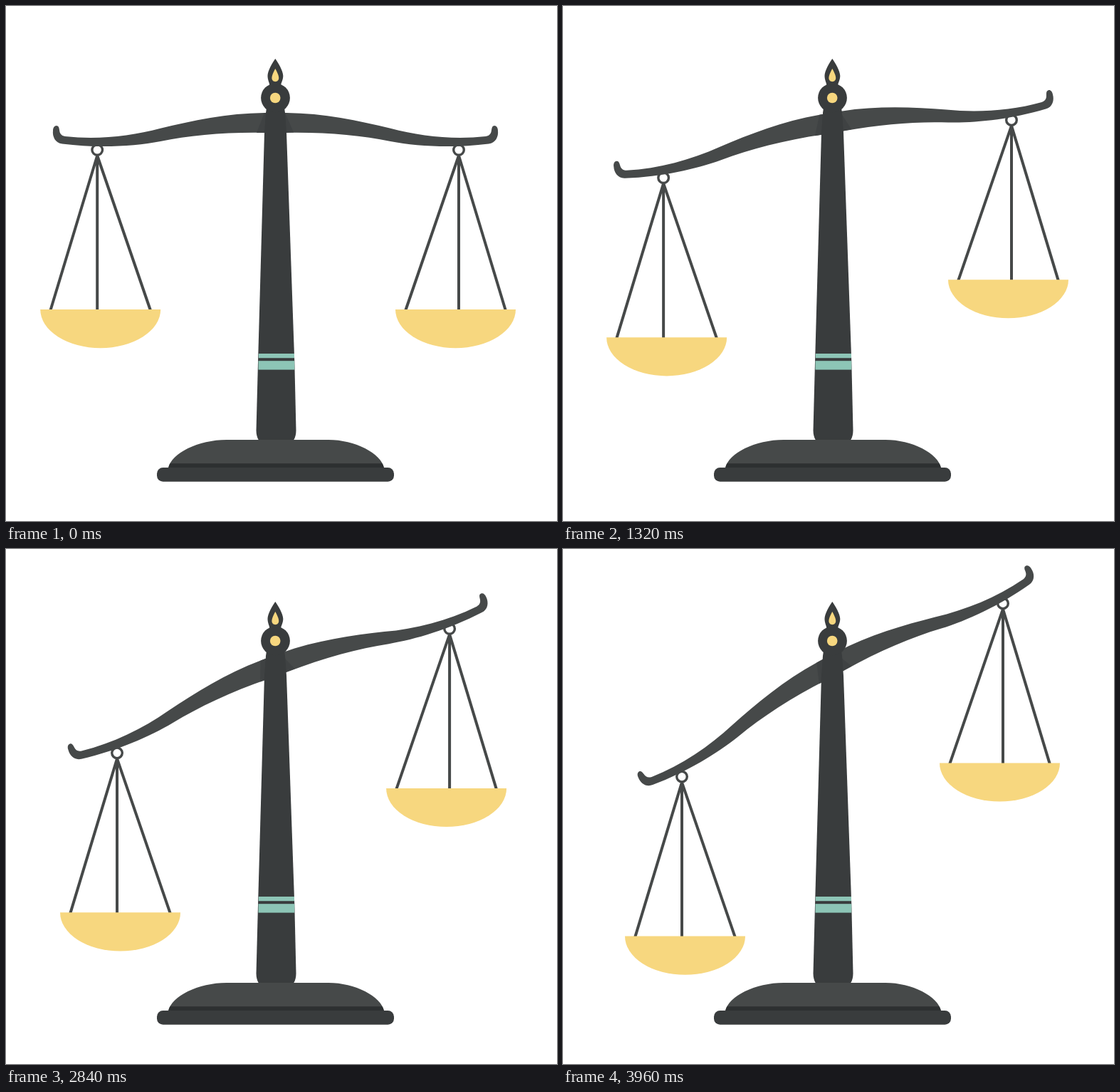
An HTML page with a canvas for the animation above (4000 ms loop, 774 px wide and 723 px high).

```html
<!DOCTYPE html>
<html lang="en">
<head>
<meta charset="utf-8">
<title>Balance scale</title>
<style>
  html, body { margin: 0; width: 100%; height: 100%; overflow: hidden; background: #fff; }
  canvas { display: block; }
</style>
</head>
<body>
<canvas id="stage" width="774" height="723"></canvas>
<script>
const ctx = document.getElementById('stage').getContext('2d');
const LOOP = 4000, STEP = 40, LAST = LOOP - STEP;
const TILT = -28 * Math.PI / 180;
const PIVOT = { x: 378.5, y: 168 };
const GREY = '#464949', DARK = '#393c3d', SHADE = '#3f4243', DEEP = '#2d3031';
const GOLD = '#f7d77f', MINT = '#8dc5b6';

// Half of the beam, relative to the pivot; the other half is its mirror image.
const halfBeam = new Path2D(`M1 -18 L-15.5 -18
  C-68 -17.5 -117 -7 -161.5 3.8 C-204 15 -250 20 -295.5 15
  C-301 14 -303 11 -303.5 6 C-304 2 -305 0 -307.5 0
  C-310.5 0 -312.5 3 -312.5 7 C-313.5 15 -309.5 24.5 -299.5 25.5
  C-248 32 -199 29 -161.5 22 C-120 13.5 -69 9 -15.5 10 L1 10 Z`);
const beamShade = new Path2D('M-15.5 -18 L13.5 -18 L25.5 9.5 L-26.5 10 Z');

const pole = new Path2D(`M366 143 L391 143 L392 150 L394 178 L405.3 500 L407.5 596
  Q407.5 604 404 609.5 L355 609.5 Q351.5 604 351.5 596 L354 500 L363 178 L365 150 Z`);
const flame = new Path2D(`M378.3 74 C382 79 389.3 91 389.3 98 C389.3 104 386.5 107 386 112
  L370.5 112 C370 107 367.5 104 367.5 98 C367.5 91 374.5 79 378.3 74 Z`);
const drop = new Path2D(`M378.3 88 C380 91 383.2 97 383.2 101 C383.2 104.2 381 106.2 378.3 106.2
  C375.6 106.2 373.4 104.2 373.4 101 C373.4 97 376.6 91 378.3 88 Z`);
const dome = new Path2D(`M228 648.5 C232 628 270 609 310 609 L453 609
  C490 609 527 628 531 648.5 Z`);

function fill(path, color) {
  ctx.fillStyle = color;
  ctx.fill(path);
}

function disc(x, y, r, color) {
  ctx.fillStyle = color;
  ctx.beginPath();
  ctx.arc(x, y, r, 0, Math.PI * 2);
  ctx.fill();
}

function rect(x, y, w, h, color) {
  ctx.fillStyle = color;
  ctx.fillRect(x, y, w, h);
}

// Ring, three strings and pan, hung around the ring centre.
function hanger(x, y, side) {
  ctx.save();
  ctx.translate(x, y);
  ctx.scale(side, 1);
  ctx.strokeStyle = GREY;
  ctx.lineWidth = 4;
  ctx.beginPath();
  for (const foot of [-66, 0, 75]) {
    ctx.moveTo(0, 8);
    ctx.lineTo(foot, 226);
  }
  ctx.stroke();
  ctx.lineWidth = 3.4;
  ctx.beginPath();
  ctx.arc(0, 0, 7.3, 0, Math.PI * 2);
  ctx.stroke();
  ctx.fillStyle = GOLD;
  ctx.beginPath();
  ctx.ellipse(4.5, 224, 84.5, 54.2, 0, 0, Math.PI);
  ctx.fill();
  ctx.restore();
}

function beam(angle) {
  ctx.save();
  ctx.translate(PIVOT.x, PIVOT.y);
  ctx.rotate(angle);
  fill(halfBeam, GREY);
  ctx.save();
  ctx.scale(-1, 1);
  fill(halfBeam, GREY);
  ctx.restore();
  fill(beamShade, SHADE);
  ctx.restore();
}

function stand() {
  fill(pole, DARK);
  rect(354.8, 488, 50.2, 6.2, MINT);
  rect(354.5, 498.2, 50.7, 12.4, MINT);

  fill(flame, DARK);
  disc(378.5, 129, 20.4, DARK);
  disc(378.2, 129, 7.3, GOLD);
  fill(drop, GOLD);

  fill(dome, GREY);
  ctx.save();
  ctx.clip(dome);
  rect(220, 642.2, 320, 7, DEEP);
  ctx.restore();
  ctx.fillStyle = DARK;
  ctx.beginPath();
  ctx.roundRect(212, 648, 333, 19.8, 8.5);
  ctx.fill();
}

function draw(time) {
  const p = Math.floor((time % LOOP) / STEP) * STEP / LAST;
  rect(0, 0, 774, 723, '#fff');
  hanger(128.2 + 38.8 * p, 202 + 117.6 * p, 1);
  hanger(636 - 18 * p, 202 - 125.6 * p, -1);
  beam(TILT * p);
  stand();
}

const start = performance.now();
function tick() {
  draw(performance.now() - start);
  requestAnimationFrame(tick);
}
tick();
</script>
</body>
</html>
```
